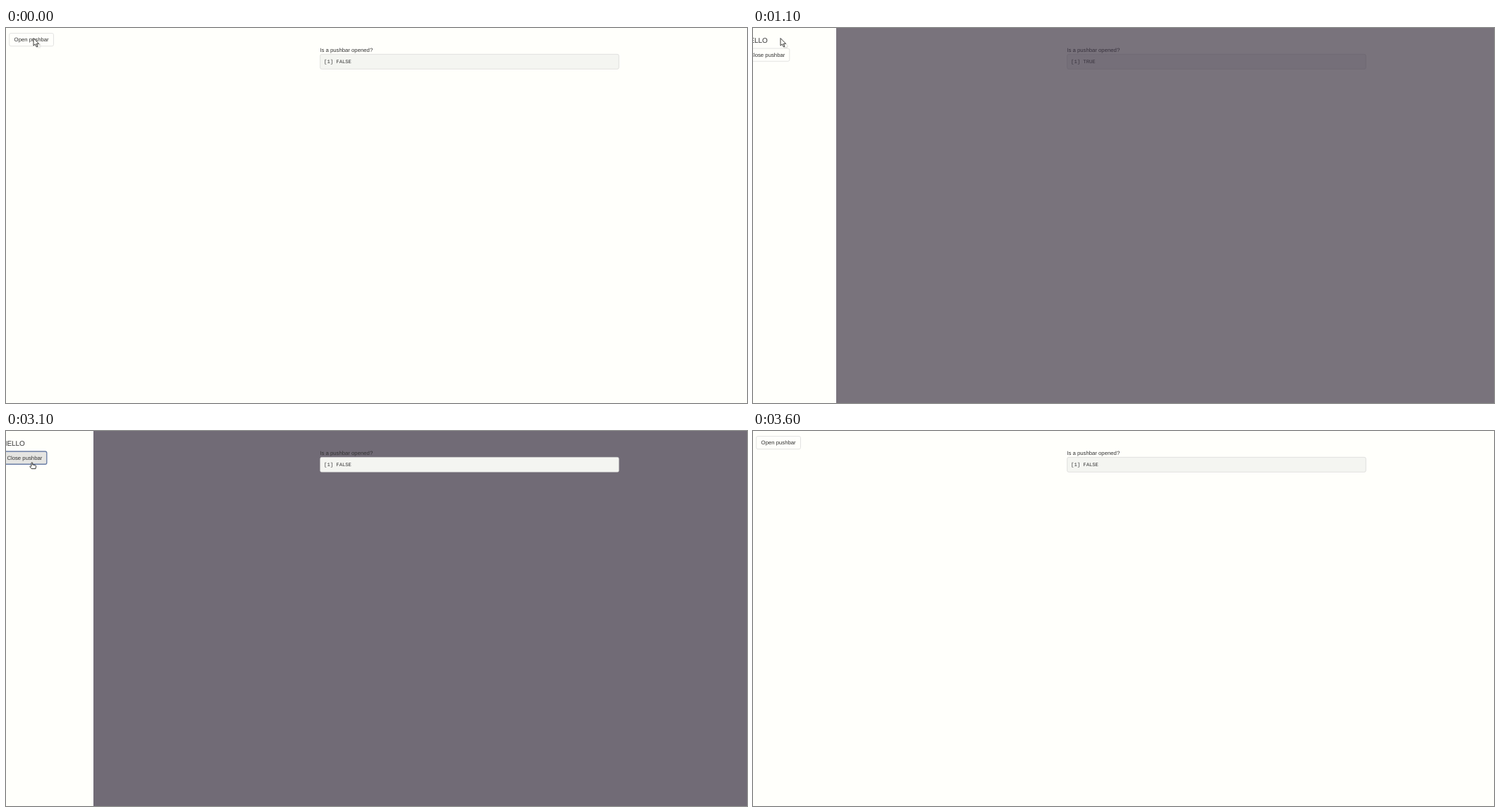
Write an HTML page that moves like this. It is 1051 by 533 pixels and loops after 5200 ms.

```html
<!DOCTYPE html>
<html lang="en">
<head>
<meta charset="utf-8">
<title>Pushbar demo</title>
<style>
  html, body { margin: 0; width: 100%; height: 100%; overflow: hidden; background: #fffffb; }
  svg { display: block; width: 100vw; height: 100vh; }
  text { font: 14px "Liberation Sans", Arial, sans-serif; fill: #333; text-rendering: geometricPrecision; }
  .mono { font: 13px "Liberation Mono", "Courier New", monospace; white-space: pre; }
  .title { font-size: 18px; }
  .tint { fill: #393041; }
  .btn rect { fill: #fffffb; stroke: #ccc; stroke-width: 1; }
  .btn.hover rect { fill: #e5e5e2; stroke: #adadad; }
  .btn.down rect { fill: #d4d4d1; }
  .btn.focus rect { stroke: #6b7fa6; stroke-width: 2.5; }
  .cursor { fill: #fffffb; stroke: #222; stroke-width: .9; stroke-linejoin: round; }
  .busy { fill: #777; stroke: none; }
</style>
</head>
<body>
<svg viewBox="0 0 1051 533" preserveAspectRatio="none">
  <rect width="1051" height="533" fill="#fffffb"/>
  <rect id="back" class="tint" width="1051" height="533"/>
  <!-- page units: 1900 px across -->
  <g transform="scale(.55316)">
    <g id="open" class="btn">
      <rect x="8.5" y="13.5" width="113.5" height="33" rx="4"/>
      <text x="21" y="35">Open pushbar</text>
    </g>
    <text x="805" y="62">Is a pushbar opened?</text>
    <rect x="805.5" y="67.5" width="766" height="38" rx="4" fill="#f4f5f1" stroke="#ccc"/>
    <text id="state" class="mono" x="815.5" y="90"></text>
  </g>
  <rect id="front" class="tint" width="1051" height="533"/>
  <g id="panel">
    <rect x="-20" width="157" height="533" fill="#fffffb"/>
    <g transform="scale(.55316)">
      <text class="title" x="13" y="38">HELLO</text>
      <g id="close" class="btn">
        <rect x="13.5" y="52.5" width="114.5" height="33" rx="4"/>
        <text x="26" y="74">Close pushbar</text>
      </g>
    </g>
  </g>
  <g id="arrow" class="cursor">
    <g id="busy" class="busy"></g>
    <path d="M0 0V10.6L2.5 8.4L4.3 12.4L6 11.6L4.2 7.8H7.6Z"/>
  </g>
  <g id="hand" class="cursor">
    <path d="M2.5 5.2V1.3Q2.5 .4 3.3 .4Q4.2 .4 4.2 1.3V3.6L8 4.3Q9.2 4.6 9.1 5.9L8.5 9.3H2.6L.6 6.7Q.2 5.9 1 5.5Q1.7 5.2 2.5 6Z"/>
  </g>
</svg>
<script>
const LOOP = 5200, WIDTH = 137;
const $ = id => document.getElementById(id);

// time, right edge of the panel, tint opacity
const slide = [
  [0, 0, 0], [900, 3, .042], [1000, 68, .4], [1100, 118, .673],
  [1200, 131, .76], [1300, 136, .8], [1400, 137, .8],
  [3100, 124, .715], [3200, 72, .43], [3300, 34, .22],
  [3400, 14, .085], [3500, 4, .025], [3600, 0, 0]
];
// time, x, y of the pointer
const pointer = [
  [0, 39, 14.5], [1400, 39, 17], [1500, 38.5, 25], [1600, 38, 36],
  [1700, 37, 46], [1800, 36.7, 51], [2000, 33.5, 47], [2400, 33.5, 44.3]
];

const at = (steps, t) => steps.filter(s => s[0] <= t).pop();
const move = (el, x, y) => el.setAttribute("transform", `translate(${x} ${y})`);
const show = (el, on) => el.style.display = on ? "" : "none";
const within = (t, a, b) => t >= a && t < b;

function setButton(el, flags) {
  for (const name in flags) el.classList.toggle(name, flags[name]);
}

const dots = Array.from({ length: 6 }, (_, i) => {
  const dot = document.createElementNS("http://www.w3.org/2000/svg", "circle");
  dot.setAttribute("cx", 7.6 + 2.4 * Math.cos(i * Math.PI / 3));
  dot.setAttribute("cy", 11.2 + 2.4 * Math.sin(i * Math.PI / 3));
  dot.setAttribute("r", 1);
  return $("busy").appendChild(dot);
});

function draw(t) {
  const [, edge, tint] = at(slide, t);
  const [, x, y] = at(pointer, t);
  const closing = t >= 3100;

  // the tint drops behind the page content once closing starts
  $("back").setAttribute("opacity", closing ? tint : 0);
  $("front").setAttribute("opacity", closing ? 0 : tint);
  move($("panel"), edge - WIDTH, 0);
  show($("panel"), edge > 0);
  $("state").textContent = within(t, 1000, 3100) ? "[1] TRUE" : "[1] FALSE";

  setButton($("open"), {
    hover: within(t, 400, 1100),
    down: within(t, 800, 900),
    focus: within(t, 800, 3100)
  });
  setButton($("close"), {
    hover: within(t, 1600, 1800) || t >= 2000,
    focus: closing
  });

  const pointing = t >= 2000;
  show($("arrow"), !pointing);
  show($("hand"), pointing && t < 3600);
  move($(pointing ? "hand" : "arrow"), x, y);
  const turn = t < 500 ? 0 : Math.floor(t / 500);
  dots.forEach((dot, i) => dot.setAttribute("opacity", .1 + .06 * ((i + turn) % 6)));
}

function tick(now) {
  const t = now % LOOP;
  draw(Math.floor(t / 100) * 100);
  requestAnimationFrame(tick);
}
draw(0);
requestAnimationFrame(tick);
</script>
</body>
</html>
```
